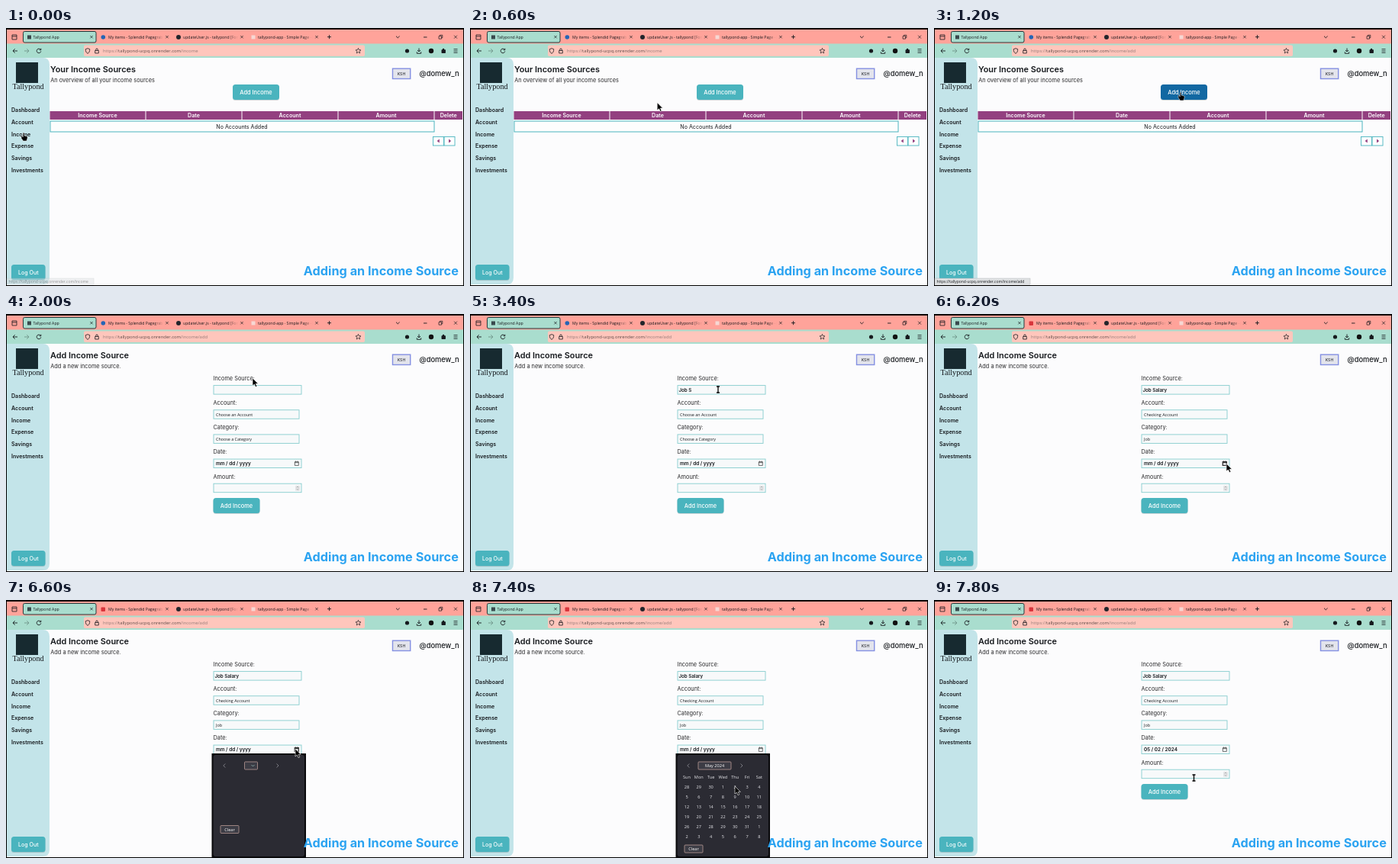
An HTML page that plays this animation: 600x338 px, repeating every 8 s.

```html
<!DOCTYPE html>
<html lang="en">
<head>
<meta charset="utf-8">
<title>Adding an income source</title>
<style>
  html, body { margin: 0; width: 100%; height: 100%; overflow: hidden; background: #000; }
  svg { display: block; }
  #stage { width: 100vw; height: 100vh; }
  text { font-family: Inter, sans-serif; white-space: pre; }
  .ui { font-family: "Open Sans", sans-serif; }
  .mark { font-family: "Liberation Serif", serif; }
</style>
</head>
<body>
<svg id="stage" viewBox="0 0 600 338"></svg>
<script>
const LOOP = 8000, STEP = 200;
const SALMON = '#ffa39a', PALE = '#ffc6bc', MINT = '#a9ddce', TEAL = '#4ab4be', PURPLE = '#934080', INK = '#16191d';
const HOST = 'tallypond-ucpq.onrender.com';

const rect = (x, y, w, h, fill, more = '') =>
  `<rect x="${x}" y="${y}" width="${w}" height="${h}" fill="${fill}" ${more}/>`;
const dot = (x, y, r, fill) => `<circle cx="${x}" cy="${y}" r="${r}" fill="${fill}"/>`;
const line = (d, color = INK, w = .9, more = '') =>
  `<path d="${d}" fill="none" stroke="${color}" stroke-width="${w}" ${more}/>`;
const text = (s, x, y, size, { fill = INK, weight = 400, anchor = 'start', cls = '', id = '' } = {}) =>
  `<text x="${x}" y="${y}" font-size="${size}" fill="${fill}" font-weight="${weight}" text-anchor="${anchor}" class="${cls}" id="${id}">${s}</text>`;
const group = (id, body) => `<g id="${id}">${body}</g>`;
const cross = (x, y, r) => line(`M${x - r} ${y - r}l${2 * r} ${2 * r}m0 ${-2 * r}l${-2 * r} ${2 * r}`, INK, .7);

function tab(x, icon, label) {
  return icon +
    `<svg x="${x + 7}" y="4" width="73" height="16">${text(label, 0, 9.7, 5.2, { cls: 'ui' })}</svg>` +
    rect(x + 66, 5, 15, 13, 'url(#fade)') + cross(x + 84, 11.7, 1.7);
}

function browser() {
  const tabs = rect(1, 2, 598, 19, SALMON) +
    line('M8 9h6v6h-6zM8 11h6', INK, .8) +
    rect(22.5, 4.5, 95.5, 14.5, MINT, 'rx="2" stroke="#28393a"') +
    rect(28, 9.5, 5, 5, '#39494d') +
    text('Tallypond App', 35.5, 13.7, 5.2, { cls: 'ui' }) + cross(112, 11.7, 1.7) +
    tab(127, group('tabBlue', dot(127.3, 12, 2.8, '#2565b5')) +
      group('tabRed', rect(124.5, 9.5, 5.5, 5.5, '#d8353c', 'rx="1"')), 'My items - Splendid Pagegrabber') +
    tab(225, dot(226, 12, 3, '#22252b'), 'updateUser.js - tallypond [Forgly]') +
    tab(323, rect(321.5, 9.5, 5, 5, '#f6d8d4'), 'tallypond-app · Simple Page · Dash') +
    line('M421 11.7h5m-2.5-2.5v5') +
    line('M511 10.7l2.3 2.2 2.3-2.2M547 12h4.5') +
    line('M567 10.7h3.5v3.5h-3.5zM568.3 10.5v-1.2h3.5v3.5h-1', INK, .7) + cross(589, 11.7, 2);
  const toolbar = rect(1, 20.5, 598, 18.5, MINT) +
    rect(102, 22.5, 368, 14.5, PALE, 'rx="2"') +
    line('M15 30h-6m2.7-2.7l-2.7 2.7 2.7 2.7') +
    line('M24 30h6m-2.7-2.7l2.7 2.7-2.7 2.7', '#6e938a') +
    line('M45.3 28.3a2.8 2.8 0 1 0 .5 2.2M45.8 26.8v2h-2') +
    line('M107 26.7l2.7 1c0 3-.6 4.5-2.7 5.7-2.1-1.2-2.7-2.7-2.7-5.7z', INK, .8) +
    line('M116.7 29.5h4.6v3.5h-4.6zM117.7 29.5v-1.2a1.3 1.3 0 0 1 2.6 0v1.2', INK, .8) +
    `<text class="ui" x="127" y="32.2" font-size="5.9" fill="#957c79">https://<tspan fill="#5f4d4b">${HOST}</tspan>/income<tspan id="urlAdd">/add</tspan></text>` +
    line('M461.5 26.4l1 2.3 2.5.2-1.9 1.6.6 2.5-2.2-1.4-2.2 1.4.6-2.5-1.9-1.6 2.5-.2z', INK, .7) +
    dot(525.5, 30, 2.6, INK) +
    line('M541 26.5v4.5m-2-2l2 2 2-2M538.3 31.3v2h5.4v-2') +
    dot(557, 30, 3.2, '#111') +
    rect(570.5, 28.3, 5.4, 4.7, INK, 'rx=".7"') + dot(573, 28, 1.2, INK) +
    line('M586.5 27.7h5m-5 2.3h5m-5 2.3h5', INK, .8);
  return tabs + toolbar;
}

const shadow = (x, y, w, h) => rect(x, y + 1, w, h, '#123c44', 'rx="3.5" opacity=".2"');

function sidebar() {
  const items = ['Dashboard', 'Account', 'Income', 'Expense', 'Savings', 'Investments'];
  return `<path d="M1 39H48Q57 39 57 48V327Q57 336 48 336H1Z" fill="#c3e4e9"/>` +
    rect(13, 45, 29, 27, '#172a30') +
    text('Tallypond', 29, 79.7, 10.2, { anchor: 'middle', cls: 'mark' }) +
    items.map((s, i) => text(s, 7, 110 + i * 15.8, 7.05, { weight: 600 })).join('') +
    shadow(7, 310, 44.5, 20) + rect(7, 310, 44.5, 20, TEAL, 'rx="3.5"') +
    text('Log Out', 29.3, 322.7, 7.1, { weight: 500, fill: '#fff', anchor: 'middle' });
}

const button = (x, y, id) => shadow(x, y, 61, 20) + rect(x, y, 61, 20, TEAL, `rx="3.5" id="${id}"`) +
  text('Add Income', x + 30.5, y + 12.8, 7.4, { weight: 500, fill: '#fff', anchor: 'middle' });

const heading = (title, sub) => text(title, 58, 57.7, 10.9, { weight: 600 }) +
  text(sub, 58.3, 71.3, 7.35, { fill: '#2a2a2c' });

function listPage() {
  const columns = ['Income Source', 'Date', 'Account', 'Amount', 'Delete'];
  return heading('Your Income Sources', 'An overview of all your income sources') +
    button(297, 74, 'addButton') +
    columns.map((s, i) => {
      const x = 57.5 + i * 126, w = i < 4 ? 125 : 36.5;
      return rect(x, 109, w, 11, PURPLE) +
        text(s, x + w / 2, 117.2, 7.1, { weight: 600, fill: '#fff', anchor: 'middle' });
    }).join('') +
    rect(58, 122, 503, 14, '#fcfdfd', `stroke="${TEAL}"`) +
    text('No Accounts Added', 309, 131.6, 7.1, { anchor: 'middle' }) +
    [559.5, 574].map(x => rect(x, 142.5, 14, 11.5, '#fff', `stroke="${TEAL}" stroke-width=".9"`)).join('') +
    `<path d="M567.8 145.5v5l-3.2-2.5zM580 145.5v5l3.2-2.5z" fill="${PURPLE}"/>`;
}

function formPage() {
  const fields = [['Income Source:', 115], ['Account:', 112], ['Category:', 112], ['Date:', 115], ['Amount:', 115]];
  const bold = { weight: 600 }, plain = { cls: 'ui', weight: 500 };
  return heading('Add Income Source', 'Add a new income source.') +
    fields.map(([label, w], i) => {
      const y = 87 + i * 32.15;
      return text(label, 271.5, y, 7.35, { fill: '#2a2a2c' }) +
        rect(272, y + 6.6, w, 11.5, '#f7f9fa', 'stroke="#86cdce" stroke-width=".9"');
    }).join('') +
    text('', 273.5, 101.7, 6.2, { ...bold, id: 'source' }) +
    text('', 275, 133.8, 5.4, { ...plain, id: 'account' }) +
    text('', 275, 166, 5.4, { ...plain, id: 'category' }) +
    text('', 275, 198.3, 6.4, { ...bold, id: 'date' }) +
    line('M378.3 193.7h5v4.7h-5zM378.3 194.7h5M379.5 193.7v-1.2m2.6 1.2v-1.2', '#333', .7, 'id="dateIcon"') +
    rect(379, 224.7, 6, 7, '#e4e5e7', 'rx="1"') +
    line('M380.7 227.3l1.3-1.3 1.3 1.3m-2.6 1.8l1.3 1.3 1.3-1.3', '#888', .6) +
    button(271.5, 241, 'submit');
}

const chip = (x, y, w, label) =>
  rect(x, y, w, 10, '#3c3c45', 'rx="1" stroke="#b99a95" stroke-width=".8"') +
  text(label, x + w / 2, y + 7, 5.6, { fill: '#fff', anchor: 'middle', cls: 'ui' });

function calendar() {
  const cell = (s, i, y) => text(s, 284 + (i % 7) * 15.8, y, 5.6, { fill: '#e8e8ec', anchor: 'middle', cls: 'ui' });
  const firstCell = new Date(2024, 3, 28);
  const days = Array.from({ length: 42 }, (_, i) => {
    const day = new Date(firstCell.getFullYear(), firstCell.getMonth(), firstCell.getDate() + i);
    return cell(day.getDate(), i, 247 + Math.floor(i / 7) * 13);
  });
  return chip(299, 212, 43, 'May 2024') +
    ['Sun', 'Mon', 'Tue', 'Wed', 'Thu', 'Fri', 'Sat'].map((s, i) => cell(s, i, 234)).join('') +
    days.join('') + chip(281, 321, 24, 'Clear');
}

function picker() {
  return rect(269.5, 201, 123.5, 137, '#08080a') +
    rect(271.5, 203, 119.5, 133, '#2b2b33', 'rx="3"') +
    line('M287.3 214.5l-2.5 2.5 2.5 2.5M354.5 214.5l2.5 2.5-2.5 2.5', '#85858c') +
    group('pickerEmpty', chip(312.5, 212, 17, '') +
      line('M321.5 216l2 2 2-2', '#8fb5b1', .8) + chip(281, 295.5, 24, 'Clear')) +
    group('pickerFull', calendar());
}

const status = () => rect(1, 328, 1, 8.5, '#dfe1e3', 'id="statusBox" stroke="#b5b8bb" stroke-width=".5"') +
  text('', 3.5, 334.2, 4.95, { cls: 'ui', id: 'statusText' });

const pointers = {
  arrow: '<path d="M0 0V10L2.4 8 4 11.6 5.8 10.8 4.2 7.3H7.3Z" fill="#000" stroke="#fff" stroke-width=".6"/>',
  hand: '<path d="M-.8 .6Q0-.5 .9 .6V4L4.6 5Q5.6 5.5 5 7.6L4 11H-.5L-3 7.3Q-3-.2-.8 6Z" fill="#000" stroke="#fff" stroke-width=".5"/>',
  beam: line('M-2-4H2M0-4V4M-2 4H2', '#000', 1.3)
};

document.getElementById('stage').innerHTML =
  `<defs><linearGradient id="fade"><stop offset="0" stop-color="${SALMON}" stop-opacity="0"/><stop offset=".9" stop-color="${SALMON}"/></linearGradient></defs>` +
  rect(0, 0, 600, 338, '#000') + rect(1, 39, 598, 298, '#fcfcfd') + browser() + sidebar() +
  group('list', listPage()) + group('form', formPage()) +
  rect(506.5, 53.2, 23.2, 13.3, '#e3e4ec', 'stroke="#8490e2" stroke-width="1.4"') +
  text('KSH', 518, 62, 5.2, { anchor: 'middle' }) +
  text('@domew_n', 567.5, 62.8, 9.3, { weight: 500, anchor: 'middle' }) +
  group('picker', picker()) + group('status', status()) +
  text('Adding an Income Source', 491.3, 324.3, 16.25, { weight: 700, fill: '#2ba3f1', anchor: 'middle' }) +
  group('cursor', Object.entries(pointers).map(([id, body]) => group(id, body)).join(''));

const el = id => document.getElementById(id);
const show = (id, on) => el(id).setAttribute('display', on ? 'inline' : 'none');
const during = (t, from, to) => t >= from && t < to;

// time, x, y, pointer shape from then on
const path = [
  [0, 23, 137, 'hand'], [200, 23, 137, 'arrow'], [800, 323, 84, 'hand'], [1400, 323, 84, 'arrow'],
  [2000, 323, 84, 'arrow'], [2400, 325, 99, 'beam'], [4200, 325, 99, 'arrow'], [4600, 325, 132, 'arrow'],
  [5000, 322, 152, 'arrow'], [5400, 322, 164, 'arrow'], [5600, 320, 182, 'arrow'], [6200, 383, 196, 'arrow'],
  [6600, 379, 195, 'arrow'], [7200, 347, 244, 'arrow'], [7600, 347, 244, 'beam'], [7800, 340.5, 233, 'beam'], [8000, 340.5, 233, 'beam']
];

function moveCursor(t) {
  const i = path.findLastIndex(p => p[0] <= t);
  const [t0, x0, y0, shape] = path[i], [t1, x1, y1] = path[i + 1];
  const u = (t - t0) / (t1 - t0), e = u * u * (3 - 2 * u);
  el('cursor').setAttribute('transform', `translate(${x0 + (x1 - x0) * e} ${y0 + (y1 - y0) * e})`);
  for (const id in pointers) show(id, id === shape);
}

function render(t) {
  const form = t >= 1400;
  show('list', !form);
  show('form', form);
  el('urlAdd').textContent = t >= 1200 ? '/add' : '';
  show('tabBlue', t < 5000);
  show('tabRed', t >= 5000);

  const hover = during(t, 800, 1400);
  el('addButton').setAttribute('fill', hover ? '#1268a2' : TEAL);
  show('status', t < 200 || hover);
  el('status').setAttribute('opacity', hover ? 1 : .45);
  el('statusBox').setAttribute('width', hover ? 125 : 114);
  el('statusText').textContent = `https://${HOST}/income${hover ? '/add' : ''}`;

  const typed = Math.max(0, Math.floor((t - 2600) / 140));
  el('source').textContent = 'Job Salary'.slice(0, typed);
  el('account').textContent = t < 5000 ? 'Choose an Account' : 'Checking Account';
  el('category').textContent = t < 5600 ? 'Choose a Category' : 'Job';
  el('date').textContent = t < 7600 ? 'mm / dd / yyyy' : '05 / 02 / 2024';
  el('dateIcon').setAttribute('stroke-width', during(t, 6200, 6800) ? 1.3 : .7);
  show('picker', during(t, 6600, 7600));
  show('pickerEmpty', t < 6800);
  show('pickerFull', t >= 6800);
  moveCursor(t);
}

const start = performance.now();
function tick() {
  const t = (performance.now() - start) % LOOP;
  render(Math.floor(t / STEP) * STEP);
  requestAnimationFrame(tick);
}
tick();
</script>
</body>
</html>
```
